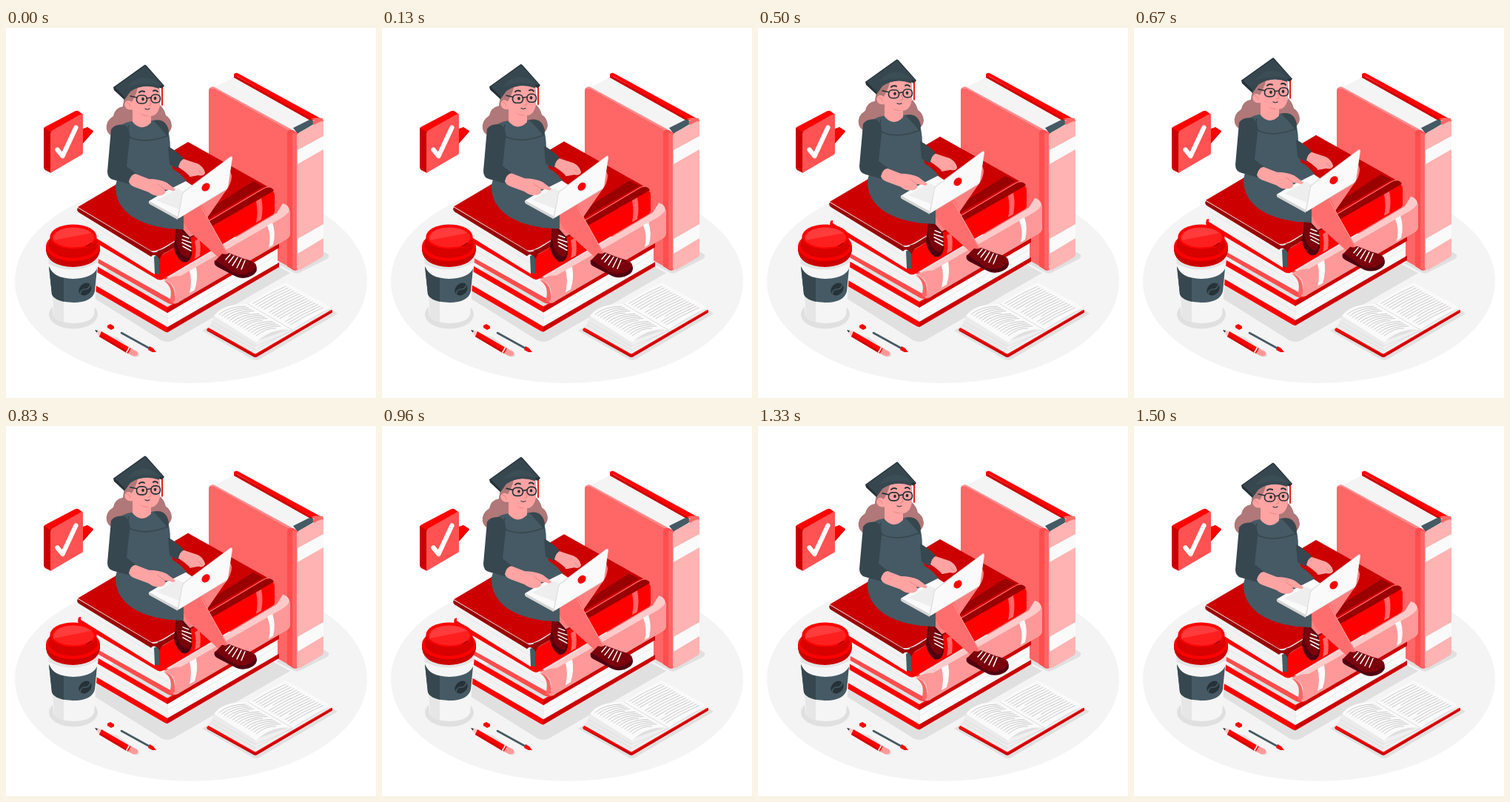
These frames come from a looping animation (500 by 500 pixels, 1540 ms). An HTML page:

```html
<!DOCTYPE html>
<html lang="en">
<head>
<meta charset="utf-8">
<title>Studying on books</title>
<style>
html, body { margin: 0; width: 100%; height: 100%; overflow: hidden; background: #fff; }
svg { display: block; width: 100vw; height: 100vh; }
.ln { fill: none; stroke-linecap: round; stroke-linejoin: round; }
.skin { fill: #ffa3a3; }
.dress { fill: #455a64; }
.dark { fill: #37474f; }
.ink { fill: #263238; }
.hair { fill: #b07878; }
.shade { fill: #e0e0e0; }
.red { fill: #f00; }
.deep { fill: #c00; }
.wine { fill: #990000; }
.page { fill: #f2f2f2; }
.white { fill: #fafafa; }
.coral { fill: #ff4d4d; }
.rose { fill: #f66; }
.blush { fill: #ff9999; }
</style>
</head>
<body>
<svg viewBox="0 0 500 500" xmlns="http://www.w3.org/2000/svg">
  <ellipse cx="250" cy="342" rx="238" ry="138" fill="#f4f4f4"/>

  <!-- ground shadows -->
  <g class="shade">
    <path d="M95 350L210 422Q218 426 226 422L384 331L250 260Z"/>
    <path d="M365 318L388 330Q393 333 398 330L434 312Q439 308 434 305L410 290Z"/>
    <ellipse cx="91" cy="387" rx="33" ry="19.500"/>
    <path d="M265 409L334 448Q338 450 342 448L448 386L436 378L280 400Z"/>
    <path d="M124 412L174 443Q180 447 180 441L150 418Z"/>
  </g>

  <!-- speech bubble -->
  <path class="deep" d="M103 139L110 134L118 140L104 156Z"/>
  <path class="red" d="M104 136L110 134L118 139L104 153Z"/>
  <path class="red" d="M51 137Q51 134 54 133L93 112.500Q96 111 99 113L104 117L61 142Z"/>
  <path class="deep" d="M51 135L61 141V196L53 192Q51 190 51 188Z"/>
  <path fill="#ff5252" d="M60 143Q60 140 63 138L101 116.500Q104 115 104 118V168Q104 171 101 172L60 196Z"/>
  <path class="ln" stroke="#fff" stroke-width="6.300" d="M69.500 164.500L76.500 173L94.500 134.500"/>

  <!-- upright book -->
  <path fill="#f4f4f4" d="M282 80L309 66L416 125L386 139Z"/>
  <path class="deep" d="M308 67V63L416 123.500L413 126Z"/>
  <path class="red" d="M308 64Q308 60 313 61L424 121.500L416 125L312 65Q309 65 308 67Z"/>
  <path class="dress" d="M388 135L411 123.500L419 128L394 143Z"/>
  <path class="rose" d="M274 85Q274 79 280 80.500L382 137L388 141V326L274 262Z"/>
  <path fill="#ff8a8a" d="M275 82Q277 78.500 281 79.500L386 137L383 139L281 82Z"/>
  <path class="coral" d="M380 141Q382 136 388 138L394 142V327Q389 329 385 325L380 322Z"/>
  <path class="rose" d="M387 142H394V327L387 325Z"/>
  <path fill="#ffb3b3" d="M393 145Q395 141 400 139L417 130Q423 125 429 124V305Q429 309 425 311L399 326Q393 329 393 324Z"/>
  <path class="rose" d="M412 123Q418 120 428 122L429 126Q423 126 417 131L414 128Q420 125 412 123Z"/>
  <path class="white" d="M394 165L429 146V164L394 184ZM394 285L429 265V284L394 305Z"/>

  <g id="float">
    <!-- bottom book -->
    <path class="deep" d="M218 404L367 318L369 317V323L218 411.500Z"/>
    <path class="red" d="M104 339V346L214 410Q218 412 218 411V404L110 336Z"/>
    <path class="page" d="M106 318L218 382V404L106 339Z"/>
    <path class="white" d="M218 382L367 296V318L218 404Z"/>
    <path class="ln" stroke="#e2e2e2" stroke-width=".7" d="M108 329L218 393L366 307M218 384V403"/>
    <path class="red" d="M104 311L218 377L369 289V291L218 385L104 319Z"/>
    <path class="deep" d="M218 379L369 291V297L218 385Z"/>

    <!-- middle book -->
    <path class="coral" d="M104 300L222 366Q228 369 232 363L234 371Q226 375 219 372L104 306Z"/>
    <path class="page" d="M104 279L222 345V366L104 300Z"/>
    <path class="ln" stroke="#e2e2e2" stroke-width=".7" d="M106 290L220 355"/>
    <path class="coral" d="M104 273L210 333L222 339L224 345L104 279Z"/>
    <path fill="#ffcaca" d="M212 342L366 250L374 237Q382 239 383 246L380 258L232 346Z"/>
    <path class="blush" d="M214 342Q224 334 236 335L372 257Q380 252 384 246V278Q384 282 380 285L236 369Q229 374 225 371Q230 366 228 354Q226 344 214 342Z"/>
    <path class="rose" d="M214 342Q230 345 228 369L222 371V366Q226 351 214 342Z"/>
    <path class="white" d="M248 328L257 323Q260 338 255 354L248 358Q252 342 248 328ZM353 267L360 263Q365 277 361 293L355 297Q359 282 353 267Z"/>

    <!-- top book -->
    <path class="red" d="M98 268L101 267L207 332L205 340L99 277Q96 275 98 268Z"/>
    <path class="page" d="M101 247L201 307V333L101 271Z"/>
    <path class="ln" stroke="#e2e2e2" stroke-width=".7" d="M103 258L200 318"/>
    <path class="dress" d="M200 309L209 305V334L201 331Z"/>
    <path class="red" d="M207 309L352 224Q362 216 363 226V247Q363 251 359 253L213 339Q207 343 202 337L206 334Q208 331 207 326Z"/>
    <path class="rose" d="M338 234L345 230Q348 244 345 259L338 263Q341 249 338 234ZM255 288L261 284Q264 294 262 308L255 312Q258 300 255 288Z"/>
    <path class="wine" d="M97 243L198 303Q203 304 212 299L351 216Q360 214 362 220L215 304Q208 307 208 313Q201 303 196 309L98 249Q95 246 97 243Z"/>
    <path class="deep" d="M97 242L246 154L353 214Q348 216 343 219L212 297Q203 302 196 301Z"/>
    <path class="wine" d="M262 253L334 207L348 214L258 266Z"/>
    <path class="wine" d="M205 301Q214 299 223 292L344 220Q352 214 360 218L216 302Q210 306 208 311Z"/>

    <!-- legs and shoes -->
    <path fill="#ff8080" d="M278 202Q302 181 305 200Q305 211 295 223L257 278L241 286L238 266Z"/>
    <path fill="#500010" d="M230 270Q236 268 240 273L249 283Q252 296 251 306Q248 319 238 316Q229 309 227 296Z"/>
    <path fill="#7a000c" d="M231 271Q236 270 239 275Q247 284 250 293Q250 305 247 310Q240 310 235 303Q228 293 231 271Z"/>
    <path class="ln" stroke="#fff" stroke-width="1.500" d="M239 281L247 284M238 286L250 290M238 290L250 296M239 295L250 301"/>
    <path fill="#ff6e6e" d="M237 252L264 238Q270 247 273 258L299 303Q296 312 287 310L248 275Q240 265 237 252Z"/>
    <path class="ln" stroke="#ff9999" stroke-width="1" d="M264 242L273 258L298 303"/>
    <path fill="#500010" d="M282 314Q280 320 286 323L311 336Q323 341 335 333Q341 328 338 321Z"/>
    <path fill="#7a000c" d="M283 314L292 305Q298 307 301 304L322 312Q340 316 338 323Q332 332 319 333Q308 333 300 325Z"/>
    <path class="ln" stroke="#fff" stroke-width="1.500" d="M303 306L297 313M308 308L301 317M313 310L306 321M318 312L312 324M323 314L318 326"/>

    <!-- hair behind -->
    <path class="hair" d="M163 92Q158 99 158 106Q147 108 145 119Q134 126 136 137Q139 149 158 148L208 147Q223 144 224 132Q223 122 216 118Q214 109 207 103Z"/>

    <!-- body -->
    <path class="dress" d="M156 131Q164 126 173 126Q184 140 197 125Q210 123 216 132Q222 143 222 164L225 190Q242 200 248 214L240 247V272C200 272 147 258 148 213L153 194Z"/>
    <path class="dark" d="M199 125Q216 121 220 139L219 148Q212 138 199 125Z"/>
    <path class="ln" stroke="#37474f" stroke-width="1.600" d="M166 132Q163 141 168 148Q188 157 217 146"/>
    <path class="dark" d="M219 160Q229 165 240 176Q240 184 232 190L221 184Z"/>
    <path class="skin" d="M233 188Q235 179 240 177L258 183Q267 187 269 196Q267 201 260 199L249 201Q245 196 233 188Z"/>
    <path class="skin" d="M171 108H196V128Q183 141 171 127Z"/>
    <path fill="#ed847e" d="M178 113L196 117Q189 123 178 113Z"/>

    <!-- head -->
    <path class="skin" d="M169 80L207 78Q210 92 208 105Q205 119 195 119Q181 118 173 110Q160 113 160 101Q162 95 170 98Z"/>
    <path class="hair" d="M161 91Q167 79 178 81Q176 90 170 100Q163 95 160 103Q158 98 161 91Z"/>
    <path class="ln" stroke="#ed847e" stroke-width="1" d="M163 101Q167 101 168 106M194 97L196 104L192 105"/>
    <g class="ln" stroke="#263238">
      <path stroke-width="2" d="M180 87Q183 84 187 86M199 85Q202 83 205 86"/>
      <path stroke-width="1.600" d="M168 92L177 94M190 95L196 94"/>
      <rect x="176.500" y="91" width="14" height="11" rx="5" stroke-width="1.600"/>
      <rect x="196" y="90" width="12.500" height="11" rx="5" stroke-width="1.600"/>
      <path stroke-width="1.100" d="M188 109Q191 111 194 109"/>
    </g>
    <ellipse class="ink" cx="185" cy="96" rx="1.800" ry="2.200"/>
    <ellipse class="ink" cx="201.500" cy="95" rx="1.800" ry="2.200"/>

    <!-- cap -->
    <path class="ink" d="M145 80L187 50Q188 49 190 51L214 78L211 82L206 80Q185 75 168 85L160 97L146 84Z"/>
    <path class="dark" d="M147 80L188 51L213 78L204 77Q193 62 173 72Q161 78 160 93Z"/>
    <path class="dark" d="M160 97Q159 76 174 69Q196 61 208 77L207 82Q185 74 168 86Z"/>
    <path class="dress" d="M164 80Q169 71 179 68Q196 63 207 77Q188 72 164 80Z" opacity=".3"/>
    <path class="ln" stroke="#e00" stroke-width="1.800" d="M211 81V104"/>

    <!-- near arm -->
    <path class="dark" d="M142 137Q148 129 160 131Q168 135 167 150L163 187L176 197L167 211L145 205Q137 203 137 194Z"/>
    <path class="skin" d="M166 208Q168 198 175 197L193 204Q207 204 217 209L229 218Q227 221 222 219L214 218Q217 224 211 226Q202 229 193 222L174 215Q168 213 166 208Z"/>

    <!-- laptop -->
    <path fill="#d6d6d6" d="M193 234L232 254V259L194 238Q192 236 193 234Z"/>
    <path class="white" d="M193 234L213 222L243 207L275 228L232 255Z"/>
    <path fill="#cfcfcf" d="M203 233L232 217L242 222L236 246Z" opacity=".3"/>
    <path class="skin" d="M195 210Q207 204 217 209L229 218Q227 222 222 219L214 218Q218 223 211 226Q202 228 193 222Z"/>
    <path class="skin" d="M236 182L258 183Q267 187 269 196L257 199L247 201L252 196L239 191Z"/>
    <path class="ln" stroke="#ed847e" stroke-width=".9" d="M205 211L215 218M260 192L266 198"/>
    <path fill="#e0e0e0" d="M231 258L238 224Q239 221 241 220L303 174Q306 172 306 176L300 215Q299 218 297 219L234 257Z"/>
    <path class="white" d="M233 257L239 225Q240 222 242 221L303 175Q306 173 305 178L300 214Q299 217 297 218Z"/>
    <ellipse class="red" cx="270" cy="215" rx="6.200" ry="4.800" transform="rotate(-45 270 215)"/>
  </g>

  <!-- coffee cup -->
  <path fill="#f5f5f5" d="M57 310L64 387Q67 398 92 399Q116 398 119 387L125 310Z"/>
  <path fill="#e3e3e3" d="M57 310L58 319Q91 335 124 317L125 310Z"/>
  <path fill="#e6e6e6" d="M63 362L65 389Q69 396 78 398V371Z"/>
  <path class="dress" d="M58 322Q63 338 91 339Q117 338 123 325L120 356Q116 371 91 371Q66 370 62 360Z"/>
  <path class="dark" d="M58 322Q64 336 78 338V370Q64 366 62 360Z"/>
  <g transform="rotate(-42 107 353)">
    <ellipse class="ink" cx="107" cy="353" rx="9.500" ry="7.500"/>
    <path class="ln" stroke="#455a64" stroke-width="1.600" d="M98 353Q103 349 107 353T116 353"/>
  </g>
  <path class="deep" d="M54 294V301Q57 322 91 323Q124 321 127 301V294Z"/>
  <ellipse class="red" cx="90.500" cy="295" rx="36.500" ry="20"/>
  <path fill="#d90000" d="M60 281L57 295Q64 310 91 311Q118 309 124 295L122 281Z"/>
  <ellipse class="red" cx="91" cy="282" rx="31.500" ry="16.500"/>
  <ellipse fill="#ff1f1f" cx="91" cy="283" rx="28" ry="13.500"/>
  <path fill="#ff3b3b" d="M64 287Q65 270 91 269.500Q108 270 115 277Z"/>
  <path class="ln" stroke="#a00" stroke-width="2" d="M109 295L115 291"/>

  <!-- pencil, pen, sharpener -->
  <path fill="#ffc9c9" d="M120 408L130 410L126 417Z"/>
  <path class="ink" d="M120 408L124 409L122.500 411.500Z"/>
  <path class="red" d="M129 410L167 432L163 439L126 417Z"/>
  <path class="deep" d="M127 415L164 436.500L163 439L126 417Z"/>
  <path fill="#f4f4f4" d="M166 431L170 434L166 441L162 438Z"/>
  <path class="red" d="M167.500 432L169 433L165 440L163.500 439Z"/>
  <path class="blush" d="M169 433L177 437Q180 440 177 443L173 444L165 440Z"/>
  <path class="ln" stroke="#455a64" stroke-width="2.600" d="M156 412L194 433"/>
  <path class="red" d="M194 430L199 433L203 438L198 438L192 435Z"/>
  <path class="red" d="M137 402L141 400L146 403V406L142 408L137 405Z"/>

  <!-- open book -->
  <path class="deep" d="M271 407L337 441L441 381V384.500L339 444.500Q337 445.500 335 444.500L272 409.500Z"/>
  <path class="red" d="M271 407L280 401L337 437L434 380L441 381L337 442Z"/>
  <path fill="#f0f0f0" d="M274 405L283 387L338 423L387 406L440 377V380.500L337 440.500Z"/>
  <path fill="#ebebeb" d="M274 405L282 388L338 424L337 440.500Z"/>
  <path class="ln" stroke="#d8d8d8" stroke-width=".7" d="M279 397L337 430L388 409M277 401L337 435L437 380"/>
  <path class="white" d="M327 373Q348 359 378 344L440 378Q409 392 387 408Z"/>
  <path class="white" d="M281 389Q293 372 327 373L387 408Q358 405 338 425Z"/>
  <path class="ln" stroke="#ddd" stroke-width="1" d="M327 373L387 408"/>
  <g id="lines" class="ln" stroke="#c4c4c4" stroke-width=".9"></g>
</svg>
<script>
const LOOP = 1540, TOP = 740, END = 1500, LIFT = 9.5;
const stack = document.getElementById('float');
const lines = document.getElementById('lines');

// rows of print on both pages
let rows = '';
for (let k = 0; k < 15; k++) {
  const x = k * 3.6, y = k * 2.06;
  rows += `<g transform="translate(${x} ${y})">
    <path d="M288 387Q301 376 ${k % 5 === 4 ? '314 377' : '324 376'}"/>
    <path d="M${k % 6 === 5 ? '343 367' : '334 372'}Q355 359 378 349"/></g>`;
}
lines.innerHTML = rows;

const ease = p => (1 - Math.cos(Math.PI * p)) / 2;

function lift(t) {
  if (t < TOP) return LIFT * ease(t / TOP);
  return LIFT * (1 - ease(Math.min(1, (t - TOP) / (END - TOP))));
}

function draw() {
  const t = performance.now() % LOOP;
  stack.setAttribute('transform', `translate(0 ${(-lift(t)).toFixed(2)})`);
  requestAnimationFrame(draw);
}
draw();
</script>
</body>
</html>
```
